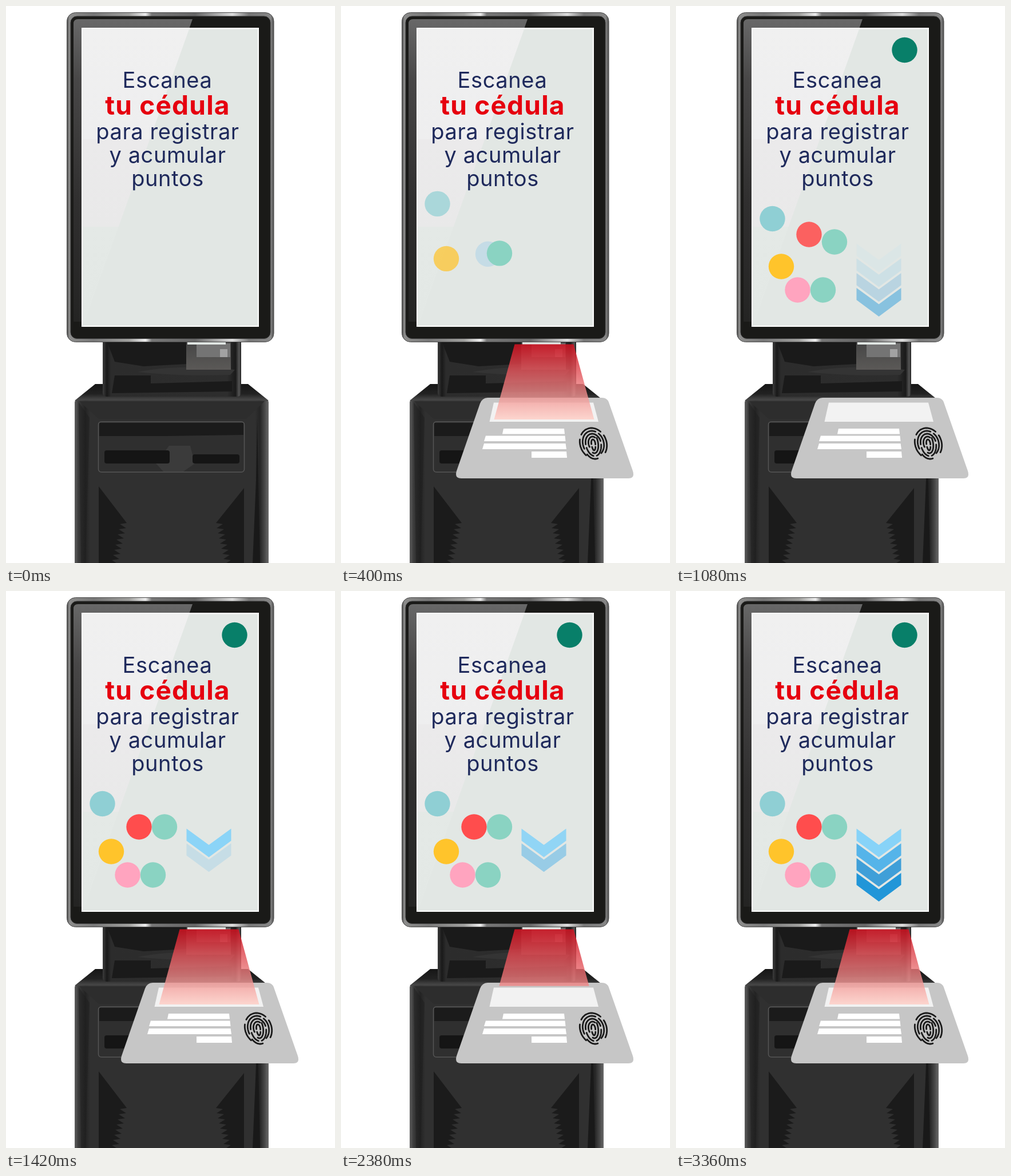
Animation, 575 px wide and 974 px high, one loop 3380 ms. Source, as an HTML page:

```html
<!DOCTYPE html>
<html lang="es">
<head>
<meta charset="utf-8">
<style>
html, body { margin: 0; width: 100%; height: 100%; overflow: hidden; background: #fff; }
svg { display: block; width: 575px; height: 974px; }
text { font: 400 38px Inter, sans-serif; letter-spacing: .6px; fill: #1f2a5c; text-anchor: middle; }
.strong { font-weight: 700; font-size: 46px; letter-spacing: 1.2px; fill: #e6000f; }
</style>
</head>
<body>
<svg viewBox="0 0 575 974">
<defs>
  <linearGradient id="rim" x1="0" x2="1" y1="0" y2="0">
    <stop offset="0" stop-color="#4a4a4a"/><stop offset=".012" stop-color="#8c8c8b"/>
    <stop offset=".13" stop-color="#777"/><stop offset=".3" stop-color="#a0a09e"/>
    <stop offset=".38" stop-color="#eee"/><stop offset=".41" stop-color="#777"/>
    <stop offset=".62" stop-color="#666"/><stop offset=".8" stop-color="#ddd"/>
    <stop offset=".88" stop-color="#777"/><stop offset=".985" stop-color="#868686"/>
    <stop offset="1" stop-color="#505050"/>
  </linearGradient>
  <linearGradient id="bezel" x1="0" x2="0" y1="0" y2="1">
    <stop offset="0" stop-color="#686868"/><stop offset=".2" stop-color="#484747"/>
    <stop offset=".6" stop-color="#302f2f"/><stop offset="1" stop-color="#242423"/>
  </linearGradient>
  <linearGradient id="gloss" x1="0" x2="0" y1="0" y2="1">
    <stop offset="0" stop-color="#f0f0f0"/><stop offset=".372" stop-color="#eeeeef"/>
    <stop offset=".372" stop-color="#ebeaeb"/><stop offset=".667" stop-color="#e9e9e9"/>
    <stop offset=".667" stop-color="#e4e9e6"/><stop offset="1" stop-color="#e3e8e5"/>
  </linearGradient>
  <linearGradient id="neck" x1="0" x2="1" y1="0" y2="0">
    <stop offset="0" stop-color="#3c3c3c"/><stop offset=".03" stop-color="#191919"/>
    <stop offset=".06" stop-color="#2c2c2c"/><stop offset=".9" stop-color="#2d2d2d"/>
    <stop offset=".96" stop-color="#1a1a1a"/><stop offset=".985" stop-color="#555"/>
    <stop offset="1" stop-color="#222"/>
  </linearGradient>
  <linearGradient id="base" x1="0" x2="1" y1="0" y2="0">
    <stop offset="0" stop-color="#5e5e5e"/><stop offset=".02" stop-color="#3b3b3b"/>
    <stop offset=".055" stop-color="#232323"/><stop offset=".08" stop-color="#303030"/>
    <stop offset=".93" stop-color="#303030"/><stop offset=".955" stop-color="#252525"/>
    <stop offset=".98" stop-color="#484848"/><stop offset="1" stop-color="#6a6a6a"/>
  </linearGradient>
  <linearGradient id="ledge" x1="0" x2="0" y1="0" y2="1">
    <stop offset="0" stop-color="#161616"/><stop offset=".6" stop-color="#222"/>
    <stop offset="1" stop-color="#4c4c4c"/>
  </linearGradient>
  <linearGradient id="reader" x1="0" x2="0" y1="0" y2="1">
    <stop offset="0" stop-color="#464646"/><stop offset="1" stop-color="#5b5957"/>
  </linearGradient>
  <linearGradient id="ray" x1="0" x2="0" y1="0" y2="1">
    <stop id="rayTop" offset="0" stop-opacity=".86"/>
    <stop id="rayEnd" offset="1"/>
  </linearGradient>
</defs>

<!-- base -->
<path d="M156 661H423L459 690H120Z" fill="url(#ledge)"/>
<path d="M120 693Q120 689 125 689H454Q459 689 459 693V974H120Z" fill="url(#base)"/>
<path d="M128 691H452L420 722H162Z" fill="#2d2d2d"/>
<path d="M121 690H458" stroke="#444" stroke-width="1.5"/>
<path d="M127 693L146 720L139 974H131Z" fill="#1e1e1e" opacity=".5"/>
<path d="M439 722L444 974H431L437 830Z" fill="#191919"/>
<rect x="161.500" y="727" width="255" height="88" rx="5" fill="#2f2f2f" stroke="#555" stroke-width="1.500"/>
<path d="M163 729H415V750L280 752H163Z" fill="#1b1b1b"/>
<path d="M262 800L285 769H322L330 800L310 814H275Z" fill="#3b3b3b"/>
<rect x="172" y="777" width="114" height="23" rx="4" fill="#151515"/>
<rect x="326" y="784" width="82" height="16" rx="4" fill="#151515"/>
<path id="shadeL" fill="#1b1b1b"/>
<path id="shadeR" fill="#1b1b1b"/>

<!-- neck -->
<path d="M169 586H411V676Q411 683 404 683H176Q169 683 169 676Z" fill="url(#neck)"/>
<path d="M177 588H316V626L240 630L190 622Z" fill="#1a1a1a"/>
<path d="M230 640Q300 626 400 636L392 645Q310 648 230 640Z" fill="#343434"/>
<path d="M190 646H253V660L395 656V674L185 677Z" fill="#1a1a1a"/>
<rect x="315" y="588" width="78" height="48" fill="url(#reader)"/>
<rect x="333" y="590" width="59" height="24" fill="#747474"/>
<rect x="374" y="600" width="13" height="14" fill="#a2a2a2"/>
<rect x="317" y="587" width="67" height="5" fill="#dfe5e2"/>

<!-- display -->
<rect x="106.500" y="11.500" width="361.500" height="576" rx="15" fill="url(#rim)" stroke="#484848"/>
<rect x="113" y="18" width="349" height="563.500" rx="11" fill="#1a1a18" stroke="#333"/>
<path d="M118 31Q118 23 126 23H326L320 40H132V552H118Z" fill="url(#bezel)"/>
<rect x="132" y="38" width="310" height="523" fill="#fff"/>
<rect x="134.500" y="40.500" width="305.500" height="518.500" fill="#e2e7e4"/>
<path d="M134.500 40.500H320L135 559H134.500Z" fill="url(#gloss)"/>
<g id="dots"></g>
<g id="arrows"></g>
<text x="282" y="143">Escanea</text>
<text x="282.500" y="190" class="strong">tu cédula</text>
<text x="282.500" y="233">para registrar</text>
<text x="282.500" y="274">y acumular</text>
<text x="282.500" y="315">puntos</text>

<g id="card">
  <path d="M257 685H456Q465 685 468 693L510 813Q514 826 502 826H210Q198 826 202 813L243 695Q247 685 257 685Z" fill="#c6c6c6"/>
  <path d="M267 693.500H441L450 727H259.500Z" fill="#f2f2f2"/>
  <path d="M284 739H390L391 748.500H282ZM253 751.500H391.500L392.500 761H250ZM250 765H392.500L394 775H247ZM333 779H394L395 790H333Z" fill="#fff"/>
  <g id="print" fill="none" stroke="#1a1a1a" stroke-width="2.800" stroke-linecap="round"></g>
</g>
<path id="beam" fill="url(#ray)"/>
</svg>
<script>
const LOOP = 3380;
const $ = id => document.getElementById(id);
const add = (parent, tag, attrs) => {
  const el = document.createElementNS("http://www.w3.org/2000/svg", tag);
  for (const k in attrs) el.setAttribute(k, attrs[k]);
  return parent.appendChild(el);
};
const clamp = v => Math.max(0, Math.min(1, v));
const span = (t, a, b) => clamp((t - a) / (b - a));
const mix = (a, b, p) => a + (b - a) * p;
const blend = (a, b, p) => `rgb(${a.map((v, i) => Math.round(mix(v, b[i], p)))})`;
const smooth = p => p * p * (3 - 2 * p);

// Piecewise-linear track of [time, value] pairs
function track(t, keys) {
  if (t <= keys[0][0]) return keys[0][1];
  for (let i = 1; i < keys.length; i++) {
    const [a, u] = keys[i - 1], [b, v] = keys[i];
    if (t <= b) return mix(u, v, (t - a) / (b - a));
  }
  return keys[keys.length - 1][1];
}

// Jagged shadows on the lower base
function shade(id, edge, top, tip, dir) {
  let d = `M${edge} ${top}L${edge + dir * 49} ${tip}`;
  for (let i = 0; i < 8; i++) {
    const y = tip + i * 9, x = edge + dir * (37 - i * 2);
    d += `L${x} ${y + 2}L${x + dir * 11} ${y + 9}`;
  }
  $(id).setAttribute("d", d + `L${edge + dir * 23} 974H${edge}Z`);
}
shade("shadeL", 162, 840, 904, 1);
shade("shadeR", 416, 843, 904, -1);

// Fingerprint ridges: nested loops with gaps
function ridge(rx, ry, from, to) {
  let d = "";
  for (let i = 0; i <= 20; i++) {
    const a = mix(from, to, i / 20) * Math.PI / 180;
    const y = ry * Math.sin(a);
    const x = rx * Math.cos(a) + y * .12;
    d += `${i ? "L" : "M"}${(441 + x).toFixed(1)} ${(765 + y).toFixed(1)}`;
  }
  add($("print"), "path", { d });
}
[[23.5, 27, 215, 310], [23.5, 27, 328, 395], [23.5, 27, 130, 195],
 [18.5, 22, 155, 290], [18.5, 22, 308, 410], [18.5, 27, 75, 135],
 [13.5, 17, 175, 345], [13.5, 22, 5, 75], [13.5, 22, 100, 160],
 [8.5, 12, 150, 300], [8.5, 17, -35, 110],
 [3.5, 7, 170, 375], [3.5, 12, 30, 150]
].forEach(a => ridge(...a));

// x, rest y, start offset, start, end, share of the move spent fading in
const dots = [
  { x: 168.5, y: 372, dy: -76, a: 40, b: 590, fade: .95, c: "#8fcfd4" },
  { x: 184, y: 455.5, dy: -33, a: 60, b: 640, fade: .82, c: "#ffc42b" },
  { x: 257, y: 496.5, dy: -84, a: 300, b: 700, fade: .2, c: "#8ad3c2", tint: [197, 220, 230] },
  { x: 277, y: 412.5, dy: 54, a: 60, b: 600, fade: .6, c: "#8ad3c2" },
  { x: 212.5, y: 496.5, dy: 47, a: 440, b: 860, fade: 1, c: "#ffa4bf" },
  { x: 232.5, y: 412.5, dy: -101, a: 680, b: 1140, fade: 1, c: "#ff4d4d" }
];
dots.forEach(d => d.el = add($("dots"), "circle", { cx: d.x, r: 22.2, fill: d.c }));
const drop = add($("dots"), "circle", { cx: 399.5, r: 22.2, fill: "#087f69" });
const dropKeys = [[500, -24], [580, 39], [670, 92], [730, 105], [800, 96.5], [900, 72], [1000, 79], [1080, 77]];

const arrows = ["#87d3f8", "#55b4e9", "#3f9fd8", "#2196d8"].map((fill, i) => {
  const y = 415.5 + i * 25.8;
  return add($("arrows"), "path", {
    fill, d: `M315.500 ${y}L354.500 ${y + 28.5}L393.500 ${y}V${y + 21.2}L354.500 ${y + 50}L315.500 ${y + 21.2}Z`
  });
});
const waves = [560, 1325, 2260, 3040];
const decay = [[0, 1], [80, .77], [160, .62], [240, .32], [320, .19], [400, .1], [480, .05], [560, 0]];

function arrowAlpha(t, i) {
  const n = waves.filter(w => t >= w).length - 1;
  if (n < 0) return 0;
  const age = t - waves[n] - i * 80;
  if (age < 80) return clamp(age / 80);
  return n === waves.length - 1 ? 1 : track(age - 80, decay);
}

const beamKeys = [[250, 0], [390, 1], [600, 1], [915, 0], [1120, 0], [1390, 1], [1660, 1],
  [1992, 0], [2200, 0], [2440, 1], [2490, 1], [2740, 0.004], [2760, .02], [3060, 1]];

function drawBeam(t) {
  const p = track(t, beamKeys);
  const y = 592 + 131 * p;
  const beam = $("beam");
  beam.setAttribute("d", `M303.500 591.500H406.500L${406.5 + 36 * p} ${y}H${303.5 - 36 * p}Z`);
  beam.style.display = p > 0 ? "" : "none";
  $("rayTop").setAttribute("stop-color", blend([216, 30, 44], [208, 16, 31], p));
  $("rayEnd").setAttribute("stop-color", blend([216, 30, 44], [255, 205, 196], p ** 1.8));
  $("rayEnd").setAttribute("stop-opacity", mix(.86, .78, p));
}

function draw(t) {
  for (const d of dots) {
    const p = span(t, d.a, d.b);
    d.el.setAttribute("cy", d.y + d.dy * (1 - p));
    d.el.setAttribute("opacity", clamp(p / d.fade));
    if (d.tint) d.el.setAttribute("fill", blend(d.tint, [138, 211, 194], smooth(span(p, .25, 1))));
  }
  drop.setAttribute("cy", track(t, dropKeys));
  arrows.forEach((el, i) => el.setAttribute("opacity", arrowAlpha(t, i)));
  const rise = 1 - span(t, 30, 320);
  $("card").setAttribute("transform", `translate(0 ${(295 * rise ** 3).toFixed(2)})`);
  drawBeam(t);
}

function tick() {
  draw(performance.now() % LOOP);
  requestAnimationFrame(tick);
}
draw(0);
tick();
</script>
</body>
</html>
```
